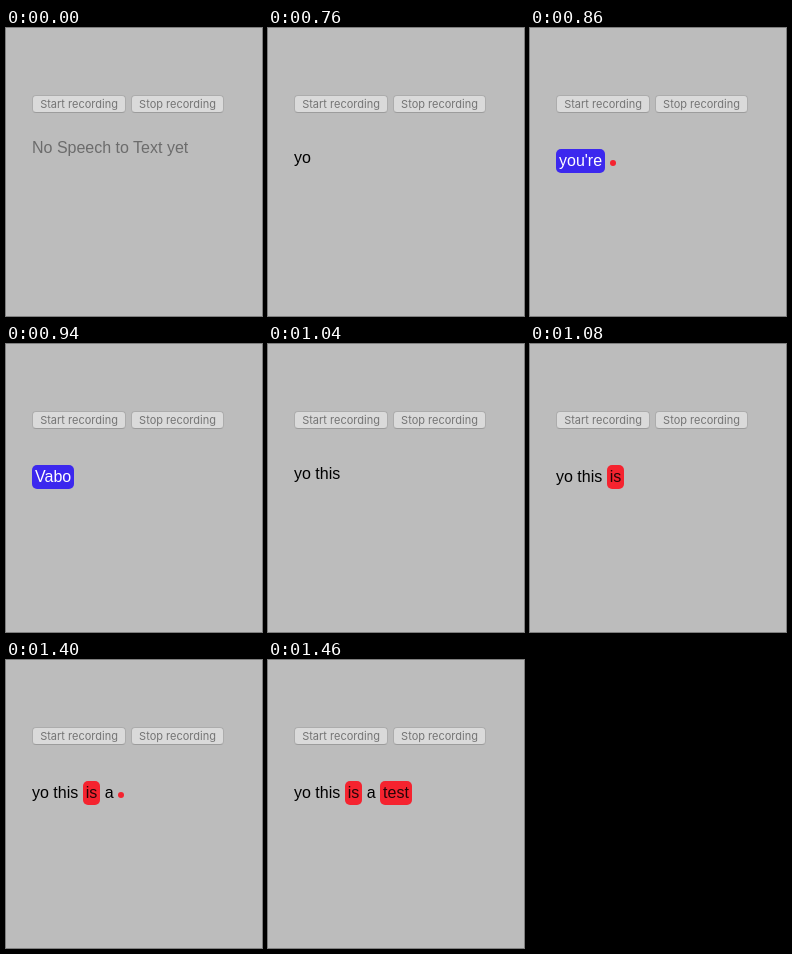
Write an HTML page that moves like this. It is 256x288 px and loops after 2.62 s.

```html
<!DOCTYPE html>
<html lang="en">
<head>
<meta charset="utf-8">
<title>Speech to text</title>
<style>
  html, body {
    margin: 0;
    width: 100%;
    height: 100%;
    overflow: hidden;
    background: #bcbcbc;
  }
  .btn {
    position: absolute;
    top: 67px;
    box-sizing: border-box;
    height: 18px;
    border: 1px solid #acacac;
    border-bottom-color: #9c9c9c;
    border-radius: 4px;
    background: #dadada;
    color: #747474;
    font: 11px/16px Inter, "Liberation Sans", sans-serif;
    text-align: center;
    white-space: nowrap;
  }
  .start { left: 26px; width: 94px; }
  .stop { left: 125px; width: 93px; }

  .view {
    position: absolute;
    left: 26px;
    top: 111px;
    width: 230px;
    height: 40px;
    overflow: hidden;
  }
  .strip { animation: listen 2620ms step-end infinite; }
  .row {
    box-sizing: border-box;
    height: 40px;
    padding-top: 10px;
    color: #000;
    font: 16px/18px "Liberation Sans", Arial, sans-serif;
    white-space: nowrap;
  }
  .empty { padding-top: 0; color: #6c6c6c; }
  .row b {
    display: inline-block;
    padding: 3px;
    border-radius: 5px;
    font-weight: normal;
  }
  .red { background: #f5232f; color: #250508; }
  .blue { background: #3c28ee; color: #fff; }

  /* Each transcript state is one 40px row of the strip. */
  @keyframes listen {
    0% { transform: translateY(0); }
    29.007% { transform: translateY(-40px); }
    30.534% { transform: translateY(-80px); }
    32.824% { transform: translateY(-120px); }
    33.587% { transform: translateY(-80px); }
    35.114% { transform: translateY(-160px); }
    39.694% { transform: translateY(-200px); }
    40.458% { transform: translateY(-240px); }
    41.221% { transform: translateY(-280px); }
    46.564% { transform: translateY(-320px); }
    53.435% { transform: translateY(-360px); }
    54.198%, 100% { transform: translateY(-400px); }
  }
</style>
</head>
<body>
  <div class="btn start">Start recording</div>
  <div class="btn stop">Stop recording</div>
  <div class="view">
    <div class="strip">
      <div class="row empty">No Speech to Text yet</div>
      <div class="row">yo</div>
      <div class="row"><b class="blue">you're</b></div>
      <div class="row"><b class="blue">you're</b> <b class="red"></b></div>
      <div class="row"><b class="blue">Vabo</b></div>
      <div class="row">yo this</div>
      <div class="row">yo this <b class="red"></b></div>
      <div class="row">yo this <b class="red">is</b></div>
      <div class="row">yo this <b class="red">is</b> a</div>
      <div class="row">yo this <b class="red">is</b> a <b class="red"></b></div>
      <div class="row">yo this <b class="red">is</b> a <b class="red">test</b></div>
    </div>
  </div>
</body>
</html>
```
